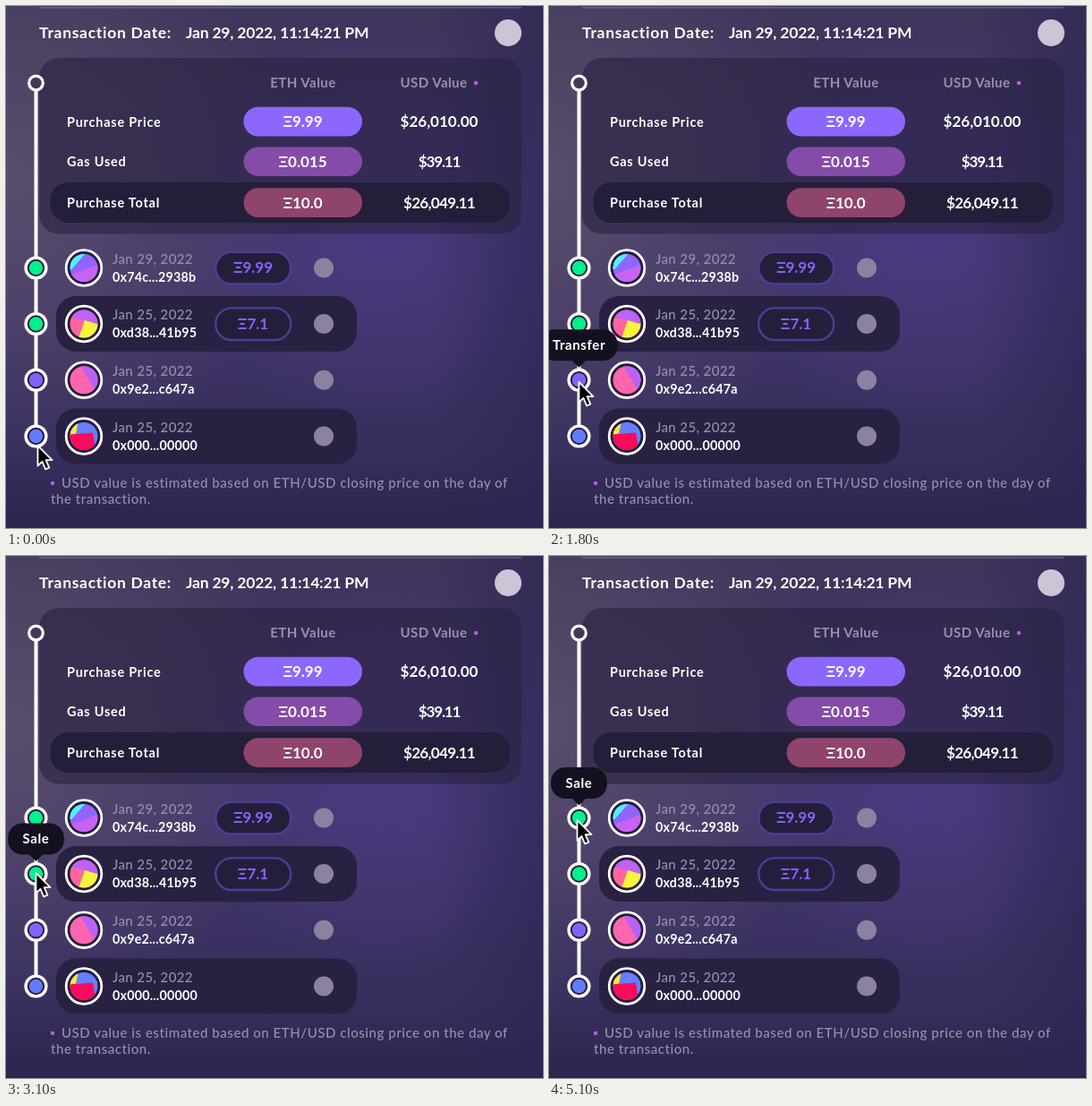
An HTML page for the animation above (5.2 s loop, 600 by 583 pixels).

```html
<!DOCTYPE html>
<html lang="en">
<head>
<meta charset="utf-8">
<title>Transaction history</title>
<style>
  html, body { margin: 0; width: 100%; height: 100%; overflow: hidden; background: #3b305f; }
  svg { display: block; width: 600px; height: 583px; }
  text { font-family: Lato, "Open Sans", sans-serif; white-space: pre; }
</style>
</head>
<body>
<svg id="stage" viewBox="0 0 600 583" xmlns="http://www.w3.org/2000/svg">
  <defs>
    <linearGradient id="base" x1="0" y1="0" x2="0" y2="1">
      <stop offset="0" stop-color="#3f3459"/>
      <stop offset=".5" stop-color="#42366a"/>
      <stop offset=".85" stop-color="#382e5d"/>
      <stop offset="1" stop-color="#2d254e"/>
    </linearGradient>
    <radialGradient id="haze" gradientUnits="userSpaceOnUse" cx="0" cy="190" r="330">
      <stop offset="0" stop-color="#5b4f6d" stop-opacity=".9"/>
      <stop offset="1" stop-color="#5b4f6d" stop-opacity="0"/>
    </radialGradient>
    <radialGradient id="glow" gradientUnits="userSpaceOnUse" cx="420" cy="240" r="230">
      <stop offset="0" stop-color="#4d3b8a" stop-opacity=".75"/>
      <stop offset="1" stop-color="#4d3b8a" stop-opacity="0"/>
    </radialGradient>
    <linearGradient id="edge">
      <stop offset=".8" stop-color="#2c2454" stop-opacity="0"/>
      <stop offset="1" stop-color="#2c2454" stop-opacity=".6"/>
    </linearGradient>
    <clipPath id="disc"><circle r="15.5"/></clipPath>
  </defs>
  <g id="page"></g>
  <g id="tips"></g>
  <path id="cursor" d="M0 0V22.5L5 17.8L8.6 26.5L12.8 24.7L9.2 16.2H16Z" fill="#000" stroke="#fff" stroke-width="1.8" stroke-linejoin="round"/>
</svg>
<script>
const LOOP = 5200, STEP = 100, LINE_X = 33.5;
const ROWS = [292.5, 355, 417.7, 480.5];
const MUTED = "#9890ab", DARK = "#251e3b", WHITE = "#fff";
const page = document.getElementById("page");
const tips = document.getElementById("tips");
const cursor = document.getElementById("cursor");

const rect = (x, y, w, h, r, fill, more = "") =>
  `<rect x="${x}" y="${y}" width="${w}" height="${h}" rx="${r}" fill="${fill}" ${more}/>`;
const circle = (x, y, r, fill, more = "") =>
  `<circle cx="${x}" cy="${y}" r="${r}" fill="${fill}" ${more}/>`;
const ring = (x, y, r, w, fill) => circle(x, y, r, fill, `stroke="#fff" stroke-width="${w}"`);

function label(x, y, str, size, { fill = WHITE, weight = 700, gap = 0, mid = false } = {}) {
  const anchor = mid ? "middle" : "start";
  return `<text x="${x}" y="${y}" font-size="${size}" font-weight="${weight}" fill="${fill}" ` +
    `letter-spacing="${gap}" text-anchor="${anchor}">${str}</text>`;
}

function backdrop() {
  return ["base", "haze", "glow", "edge"].map(id => rect(0, 0, 600, 583, 0, `url(#${id})`)).join("") +
    rect(37, 1, 539, 1.6, 0, "#83799a", 'opacity=".6"');
}

function summary() {
  const lines = [
    [129, "Purchase Price", "Ξ9.99", "$26,010.00", "#8c67ff", 0],
    [173.7, "Gas Used", "Ξ0.015", "$39.11", "#854ba9", -1.1],
    [219.5, "Purchase Total", "Ξ10.0", "$26,049.11", "#8f446b", -.7]
  ];
  const head = { fill: MUTED, gap: .45, mid: true };
  let out = label(37, 36, "Transaction Date:", 17.5, { gap: .7 }) +
    label(201, 36, "Jan 29, 2022, 11:14:21 PM", 17.5, { gap: -.2 }) +
    circle(561, 30, 15, "#cbc5d6") +
    rect(37, 58, 539, 196.5, 22, "#2b2243", 'opacity=".62"') +
    rect(49.5, 197, 513.5, 45, 20, DARK) +
    label(332, 91, "ETH Value", 15, head) +
    label(478, 91, "USD Value", 15, head) +
    circle(525, 86, 2.3, "#b75be6");
  for (const [y, name, eth, usd, color, gap] of lines) {
    out += label(68, y + 5.5, name, 14.5, { gap: .75 }) +
      rect(265.5, y - 16.2, 132.5, 32.6, 16.3, color) +
      label(331.5, y + 6, eth, 17, { mid: true }) +
      label(484, y + 6, usd, 17, { mid: true, gap });
  }
  return out;
}

const ART = [
  ["#8f65fb", "#4ff0f5", "M-16-16H2L-1-13L-14 2L-18 0Z", "#c862f3", "M-16 8L16-4V16H-16Z"],
  ["#ff649f", "#be62f8", "M-16-16H16V0L1-4L-16-8Z", "#f6f53e", "M1-4L18 1V16H-6Z"],
  ["#ff65ae", "#f3e04c", "M-16-8L-6-16H-16Z", "#b962f4", "M-4-16L13 13L18 0V-16Z"],
  ["#667fff", "#f5e83c", "M-16-1V-16H-6L-9-3Z", "#fb0b5b", "M-16-2L10-4L12 8L16 16H-16Z"]
];

function avatar(y, [base, c1, d1, c2, d2]) {
  return ring(87, y, 19.8, 2.8, DARK) +
    `<g transform="translate(87 ${y})"><g clip-path="url(#disc)">${circle(0, 0, 16, base)}` +
    `<path d="${d1}" fill="${c1}"/><path d="${d2}" fill="${c2}"/></g></g>`;
}

function history() {
  const items = [
    ["Jan 29, 2022", "0x74c...2938b", "Ξ9.99"],
    ["Jan 25, 2022", "0xd38...41b95", "Ξ7.1"],
    ["Jan 25, 2022", "0x9e2...c647a"],
    ["Jan 25, 2022", "0x000...00000"]
  ];
  return items.map(([date, wallet, price], i) => {
    const y = ROWS[i];
    let out = i % 2 ? rect(56, y - 31, 336, 62, 22, "#292142") : "";
    out += avatar(y, ART[i]) +
      label(119, y - 4.8, date, 15, { fill: MUTED, weight: 500, gap: .4 }) +
      label(119, y + 15.3, wallet, 14.3, { gap: .2 }) +
      circle(355, y, 11, "#8a829e");
    if (price) {
      out += rect(234.2, y - 17.6, 84, 35.6, 17.8, DARK, 'stroke="#4e3d94" stroke-width="2.4"') +
        label(276, y + 5.8, price, 17, { fill: "#8a63fb", mid: true });
    }
    return out;
  }).join("");
}

function timeline() {
  const colors = ["#00f08c", "#00f08c", "#8660fb", "#627cff"];
  return rect(LINE_X - 2, 86, 4, 394, 0, WHITE) +
    ring(LINE_X, 86, 7.8, 3.2, "#43385b") +
    ROWS.map((y, i) => ring(LINE_X, y, 11.4, 3.4, DARK) + circle(LINE_X, y, 7.7, colors[i])).join("");
}

function note() {
  const style = { fill: MUTED, weight: 500, gap: .55 };
  return circle(52, 533, 2.3, "#b75be6") +
    label(62, 538, "USD value is estimated based on ETH/USD closing price on the day of", 15, style) +
    label(50, 555.5, "the transaction.", 15, style);
}

page.innerHTML = backdrop() + summary() + timeline() + history() + note();

// row, text, half width, fade-in start and end, fade-out start and end
const TIPS = [
  [3, "Mint", 31.3, 100, 400, 1100, 1500],
  [2, "Transfer", 43, 1200, 1500, 2150, 2560],
  [1, "Sale", 31.3, 2200, 2500, 3750, 4150],
  [0, "Sale", 31.3, 3800, 4150, 9000, 9100]
];
tips.innerHTML = TIPS.map(([row, text, half]) => {
  const y = ROWS[row] - 39;
  return `<g>${rect(LINE_X - half, y - 17.5, half * 2, 35, 16, "#14101f")}` +
    `<path d="M${LINE_X - 8} ${y + 17}h16l-8 8z" fill="#14101f"/>` +
    label(LINE_X, y + 5, text, 15, { mid: true, gap: .6 }) + "</g>";
}).join("");

// time, x, y of the pointer tip
const PATH = [
  [0, 35.5, 491], [500, 33.5, 483], [1000, 33.5, 483], [1400, 33.5, 420],
  [2000, 33.5, 420], [2400, 33.5, 354], [3400, 33.5, 354], [3700, 33.5, 322],
  [3950, 33.5, 294], [4700, 33.5, 294], [5000, 31.5, 295], [LOOP, 31.5, 295]
];
const clamp = v => Math.min(1, Math.max(0, v));
const ramp = (t, a, b) => clamp((t - a) / (b - a));
const ease = k => k * k * (3 - 2 * k);

function pointer(t) {
  const i = PATH.findIndex(p => p[0] > t);
  const [a, x0, y0] = PATH[i - 1], [b, x1, y1] = PATH[i];
  const k = ease(ramp(t, a, b));
  return [x0 + (x1 - x0) * k, y0 + (y1 - y0) * k];
}

function draw(t) {
  const [x, y] = pointer(t);
  cursor.setAttribute("transform", `translate(${x} ${y})`);
  TIPS.forEach(([, , , in0, in1, out0, out1], i) => {
    tips.children[i].setAttribute("opacity", ramp(t, in0, in1) * (1 - ramp(t, out0, out1)));
  });
}

const start = performance.now();
function tick() {
  const t = (performance.now() - start) % LOOP;
  draw(Math.floor(t / STEP) * STEP);
  requestAnimationFrame(tick);
}
draw(0);
requestAnimationFrame(tick);
</script>
</body>
</html>
```
